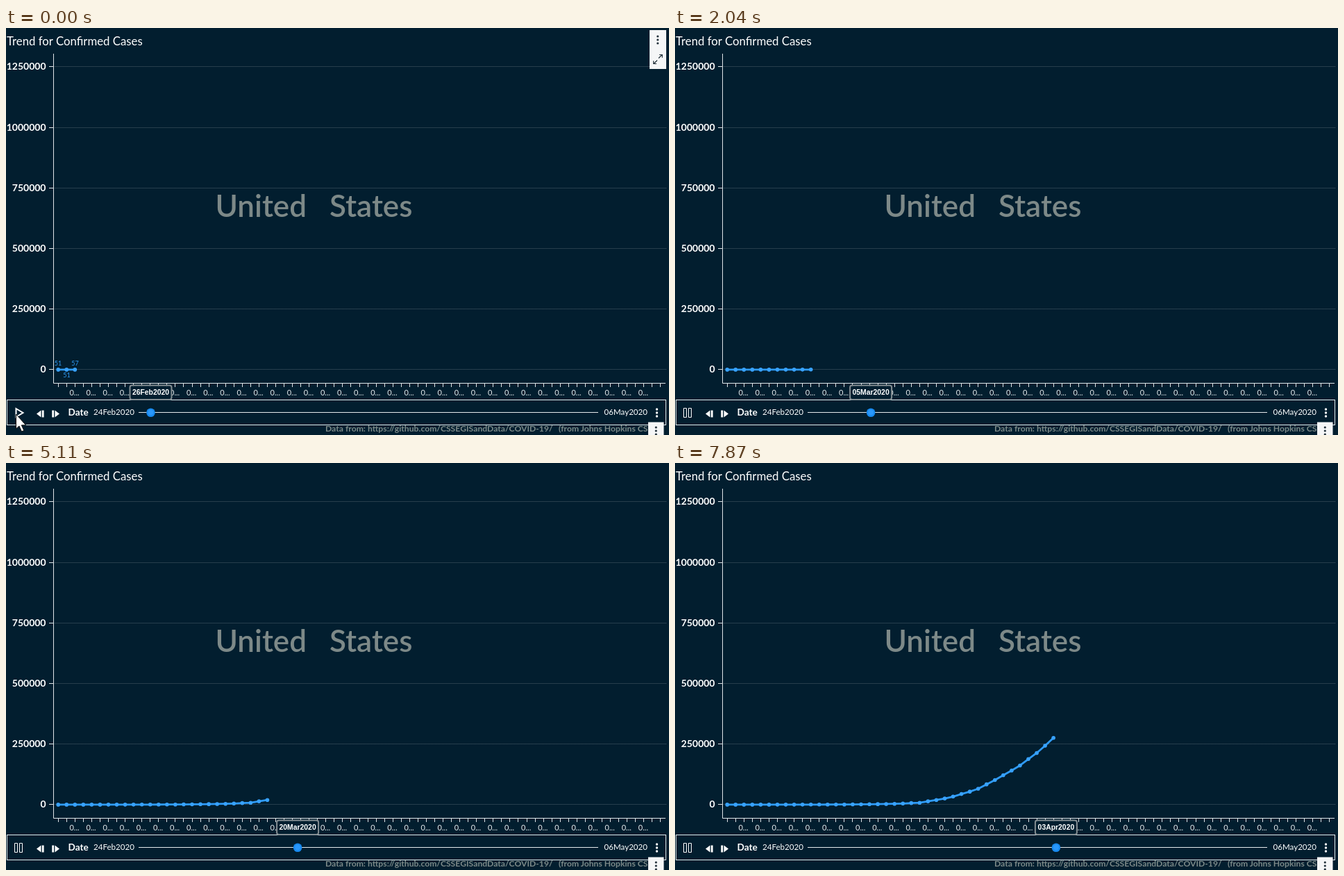
These frames come from a looping animation (955 by 586 pixels, 8 s). An HTML page:

```html
<!DOCTYPE html>
<html lang="en">
<head>
<meta charset="utf-8">
<title>Trend for Confirmed Cases</title>
<style>
  html, body { margin: 0; width: 100%; height: 100%; overflow: hidden; background: #021e2f; }
  svg { display: block; width: 955px; height: 586px; font-family: Lato, "Open Sans", sans-serif; fill: #fff; }
  .axis { stroke: #dfe4e7; stroke-width: 1; fill: none; }
  .grid { stroke: #4b5d69; stroke-dasharray: 1 1; }
  .num { font-size: 14px; font-weight: 700; text-anchor: end; }
  .tick { font-size: 11px; text-anchor: middle; fill: #e8ecee; }
  .big { font-size: 44px; font-weight: 600; fill: #7d8988; }
  .small { font-size: 11.6px; }
  .foot { font-size: 12.2px; font-weight: 700; fill: #7d8988; }
  .val { font-size: 9px; text-anchor: middle; fill: #2f9bf5; }
  .tip { font: 700 10.4px "Liberation Sans", Arial, sans-serif; text-anchor: middle; }
  .icon { fill: none; stroke: #fff; }
</style>
</head>
<body>
<svg viewBox="0 0 955 586">
  <rect width="955" height="586" fill="#021e2f"/>
  <text x="1" y="25" font-size="16.8">Trend for Confirmed Cases</text>
  <text class="big" x="301.5" y="272">United</text>
  <text class="big" x="466" y="272">States</text>
  <g id="axes"></g>
  <g id="values">
    <text class="val" x="75" y="486">51</text>
    <text class="val" x="87.5" y="503">51</text>
    <text class="val" x="99.5" y="486">57</text>
  </g>
  <path id="line" fill="none" stroke="#2f9bf8" stroke-width="2.8" stroke-linejoin="round"/>
  <g id="dots" fill="#38a2ff"></g>

  <rect x="1.5" y="535.5" width="949" height="36" fill="none" stroke="#e6eaec"/>
  <path id="play" class="icon" d="M14.5 548L24.5 554L14.5 560Z" stroke-width="2"/>
  <path id="pause" class="icon" d="M12.5 547.5h4v13h-4zM19.5 547.5h4v13h-4z"/>
  <path d="M50.5 550.5v10L44 555.5ZM51.8 550.5h2.8v10h-2.8zM66.3 550.5h2.8v10h-2.8zM70.4 550.5v10L77 555.5Z"/>
  <text x="89.5" y="558" font-size="13.6" font-weight="700">Date</text>
  <text class="small" x="126" y="557">24Feb2020</text>
  <text class="small" x="861.5" y="557">06May2020</text>
  <path d="M191 553.5H853" stroke="#e6eaec"/>
  <g><circle cx="937.5" cy="549" r="1.7"/><circle cx="937.5" cy="554" r="1.7"/><circle cx="937.5" cy="559" r="1.7"/></g>
  <g id="handle">
    <circle cy="553.8" r="6.3" fill="#1789ee"/>
    <circle cy="553.5" r="4" fill="#2997fa"/>
    <rect x="-30" y="514.5" width="60" height="20.5" rx="3" fill="#021e2f" fill-opacity=".9" stroke="#848d92" stroke-width="2"/>
    <text id="date" class="tip" y="527.5"></text>
  </g>

  <text class="foot" x="460" y="581">Data from:</text>
  <text class="foot" x="521" y="581">https://github.com/CSSEGISandData/COVID-19/</text>
  <text class="foot" x="796" y="581">(from Johns Hopkins CSSE</text>
  <path d="M947.5 572.5H955V586H947.5Z" fill="#021e2f"/>
  <rect x="925" y="567.5" width="22.5" height="19" fill="#f5f6f7"/>
  <g fill="#23313b"><circle cx="936.3" cy="575" r="1.6"/><circle cx="936.3" cy="580" r="1.6"/><circle cx="936.3" cy="585" r="1.6"/></g>

  <g id="menu">
    <rect x="927" y="3" width="24" height="56" fill="#f5f6f7"/>
    <g fill="#23313b"><circle cx="938.8" cy="12" r="1.6"/><circle cx="938.8" cy="17" r="1.6"/><circle cx="938.8" cy="22" r="1.6"/></g>
    <path d="M940 43.5L945 38.5M941 38.5H945.3V42.8M938 46.5L933 51.5M932.7 47.2V51.5H937" fill="none" stroke="#23313b" stroke-width="1.2"/>
  </g>
  <path id="cursor" d="M14.5 556V577L19 573L22.5 581L25.8 579.5L22.3 571.8H28.5Z" stroke="#111" stroke-width="1"/>
</svg>
<script>
const LOOP = 8000;
const TIMES = [0, 350, 680, 1010, 1360, 1690, 2040, 2390, 2720, 3070, 3400, 3750, 4100,
  4430, 4780, 5110, 5460, 5810, 6140, 6490, 6840, 7170, 7520, 7870];
const CASES = [51, 51, 57, 58, 60, 68, 74, 98, 118, 149, 217, 262, 402, 518, 583, 959, 1281,
  1663, 2179, 2727, 3499, 4632, 6421, 7783, 13677, 19100, 25489, 33276, 43847, 53740, 65778,
  83836, 101657, 121478, 140886, 161807, 188172, 213372, 243453, 275586];
const MENU_FADE = [1, .75, .5, .25];
const DAYS = 73;

const $ = id => document.getElementById(id);
const dayX = i => 75.2 + 12.05 * i;
const caseY = n => 491.9 - n * 87.2 / 250000;

function add(parent, tag, attrs, text) {
  const el = document.createElementNS('http://www.w3.org/2000/svg', tag);
  for (const k in attrs) el.setAttribute(k, attrs[k]);
  if (text) el.textContent = text;
  return parent.appendChild(el);
}

const axes = $('axes');
for (let n = 0; n <= 1250000; n += 250000) {
  const y = Math.floor(caseY(n)) + .5;
  add(axes, 'path', { class: 'axis grid', d: `M68 ${y}H951` });
  add(axes, 'path', { class: 'axis', d: `M62 ${y}H68` });
  add(axes, 'text', { class: 'num', x: 57.5, y: y + 4 }, String(n));
}
add(axes, 'path', { class: 'axis', d: 'M68.5 37V511.5H950' });
for (let i = 0; i < DAYS; i++) {
  add(axes, 'path', { class: 'axis', d: `M${Math.floor(dayX(i)) + .5} 512V517` });
  if (i && i % 2 === 0 && i < 72) add(axes, 'text', { class: 'tick', x: dayX(i) - .8, y: 529 }, '0...');
}

const dots = CASES.map((n, i) => add($('dots'), 'circle', { cx: dayX(i), cy: caseY(n), r: 2.8 }));

function dateLabel(i) {
  const d = new Date(Date.UTC(2020, 1, 24 + i));
  const month = ['Jan', 'Feb', 'Mar', 'Apr'][d.getUTCMonth()];
  return String(d.getUTCDate()).padStart(2, '0') + month + '2020';
}

const show = (id, on) => $(id).setAttribute('visibility', on ? 'visible' : 'hidden');

function draw(step) {
  // playback advances 4.92 days per second
  const day = Math.max(2, Math.floor(.66 + 4.92 * TIMES[step] / 1000));
  const pts = CASES.slice(0, day + 1).map((n, i) => `${dayX(i)} ${caseY(n)}`);
  $('line').setAttribute('d', 'M' + pts.join('L'));
  dots.forEach((dot, i) => dot.setAttribute('visibility', i <= day ? 'visible' : 'hidden'));
  $('handle').setAttribute('transform', `translate(${190.1 + 9.2 * day} 0)`);
  $('date').textContent = dateLabel(day);
  $('menu').setAttribute('opacity', MENU_FADE[step] || 0);
  show('values', step === 0);
  show('play', step === 0);
  show('pause', step > 0);
  show('cursor', step < 2);
}

let last = -1;
function tick() {
  const t = performance.now() % LOOP;
  const step = TIMES.filter(s => s <= t).length - 1;
  if (step !== last) draw(last = step);
  requestAnimationFrame(tick);
}
tick();
</script>
</body>
</html>
```
